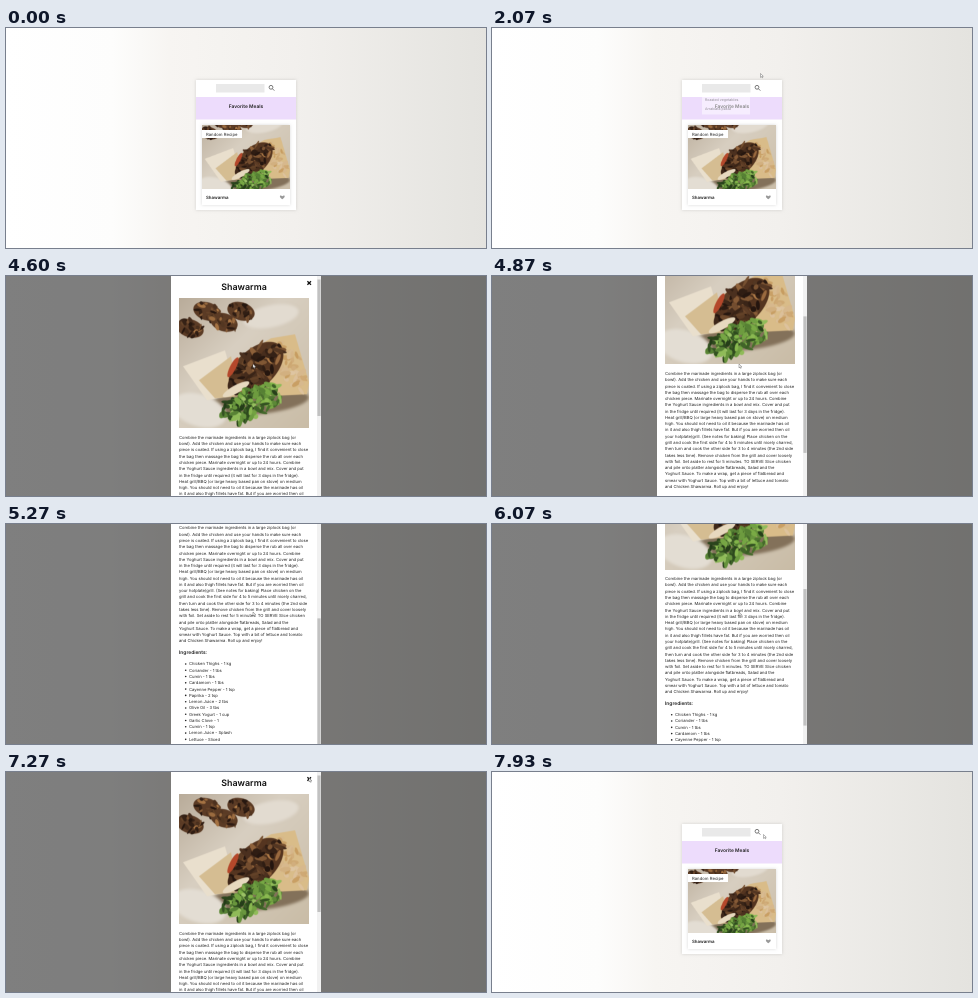
Animation, 480 px wide and 220 px high, one loop 8000 ms. Source, as an HTML page with a canvas:

```html
<!DOCTYPE html>
<html lang="en">
<head>
<meta charset="utf-8">
<title>Favorite Meals</title>
<style>
html, body { margin: 0; width: 100%; height: 100%; overflow: hidden; background: #f6f4f1; }
canvas { display: block; width: 480px; height: 220px; }
</style>
</head>
<body>
<canvas id="stage"></canvas>
<script>
const W = 480, H = 220, LOOP = 8000;
const OPEN = 3870, CLOSE = 7530, MAX_SCROLL = 157.5, LINE = 6.28;
const canvas = document.getElementById('stage');
const ctx = canvas.getContext('2d');
const dpr = window.devicePixelRatio || 1;
canvas.width = W * dpr;
canvas.height = H * dpr;

const method = `Combine the marinade ingredients in a large ziplock bag (or
bowl). Add the chicken and use your hands to make sure each
piece is coated. If using a ziplock bag, I find it convenient to close
the bag then massage the bag to disperse the rub all over each
chicken piece. Marinate overnight or up to 24 hours. Combine
the Yoghurt Sauce ingredients in a bowl and mix. Cover and put
in the fridge until required (it will last for 3 days in the fridge).
Heat grill/BBQ (or large heavy based pan on stove) on medium
high. You should not need to oil it because the marinade has oil
in it and also thigh fillets have fat. But if you are worried then oil
your hotplate/grill. (See notes for baking) Place chicken on the
grill and cook the first side for 4 to 5 minutes until nicely charred,
then turn and cook the other side for 3 to 4 minutes (the 2nd side
takes less time). Remove chicken from the grill and cover loosely
with foil. Set aside to rest for 5 minutes. TO SERVE Slice chicken
and pile onto platter alongside flatbreads, Salad and the
Yoghurt Sauce. To make a wrap, get a piece of flatbread and
smear with Yoghurt Sauce. Top with a bit of lettuce and tomato
and Chicken Shawarma. Roll up and enjoy!`.split('\n');

const ingredients = `Chicken Thighs - 1 kg
Coriander - 1 tbs
Cumin - 1 tbs
Cardamom - 1 tbs
Cayenne Pepper - 1 tsp
Paprika - 2 tsp
Lemon Juice - 2 tbs
Olive Oil - 3 tbs
Greek Yogurt - 1 cup
Garlic Clove - 1
Cumin - 1 tsp
Lemon Juice - Splash
Lettuce - Sliced`.split('\n');

// Pointer moves; it rests wherever the last one ended
const moves = [
  { from: 270, to: 530, x: 238, y: 74 },
  { from: 730, to: 1400, x: 236, y: 60 },
  { from: 1800, to: 2060, x: 268.5, y: 45.5 },
  { from: 2130, to: 2600, x: 262, y: 152 },
  { from: 2670, to: 3470, x: 274, y: 130 },
  { from: 3530, to: 3670, x: 235, y: 133 },
  { from: 4330, to: 4580, x: 247, y: 88 },
  { from: 6730, to: 7270, x: 303, y: 6 },
  { from: 7730, to: 7930, x: 271.5, y: 62.5 }
];

const ramp = (t, a, b) => Math.max(0, Math.min(1, (t - a) / (b - a)));
const ease = p => p * p * (3 - 2 * p);
const mix = (a, b, p) => a + (b - a) * p;

function rect(c, x, y, w, h, fill) {
  c.fillStyle = fill;
  c.fillRect(x, y, w, h);
}

function oval(c, x, y, rx, ry, turn, fill) {
  c.beginPath();
  c.ellipse(x, y, rx, ry, turn, 0, Math.PI * 2);
  c.fillStyle = fill;
  c.fill();
}

function shape(c, points, fill) {
  c.beginPath();
  points.forEach(([x, y]) => c.lineTo(x, y));
  c.closePath();
  c.fillStyle = fill;
  c.fill();
}

function text(s, x, y, size, { bold = false, align = 'left', fill = '#222' } = {}) {
  ctx.font = `${bold ? 600 : 400} ${size}px Inter, sans-serif`;
  ctx.textAlign = align;
  ctx.fillStyle = fill;
  ctx.fillText(s, x, y);
}

function shadowBox(x, y, w, h) {
  ctx.save();
  ctx.shadowColor = 'rgba(0,0,0,0.15)';
  ctx.shadowBlur = 3 * dpr;
  rect(ctx, x, y, w, h, '#fff');
  ctx.restore();
}

function makeRandom(seed) {
  return () => (seed = (seed * 16807) % 2147483647) / 2147483647;
}

// Simplified dish picture, painted once in 130 x 130 units
function paintDish() {
  const pic = document.createElement('canvas');
  pic.width = pic.height = 520;
  const c = pic.getContext('2d');
  const rnd = makeRandom(41);
  c.scale(4, 4);

  // Fill a tilted ellipse with small flecks; tone gets a value from 0 to 1
  function scatter(x, y, rx, ry, turn, count, size, tone) {
    c.save();
    c.translate(x, y);
    c.rotate(turn);
    for (let i = 0; i < count; i++) {
      const a = rnd() * Math.PI * 2, d = Math.sqrt(rnd());
      oval(c, Math.cos(a) * rx * d, Math.sin(a) * ry * d,
        size * (0.5 + rnd()), size * (0.3 + rnd() * 0.4), rnd() * 3, tone(rnd()));
    }
    c.restore();
  }
  const roast = v => `hsl(${18 + v * 12} 42% ${10 + v * v * 40}%)`;
  const herb = v => `hsl(${100 - v * 15} 42% ${16 + v * 42}%)`;
  const crust = v => `hsl(35 48% ${58 + v * 18}%)`;

  const cloth = c.createLinearGradient(0, 0, 130, 130);
  cloth.addColorStop(0, '#b9ac9a');
  cloth.addColorStop(0.4, '#d8cfc1');
  cloth.addColorStop(1, '#c9bca6');
  rect(c, 0, 0, 130, 130, cloth);

  c.filter = 'blur(6px)';
  oval(c, 78, 104, 52, 12, -0.1, '#83715a');
  oval(c, 20, 112, 28, 16, 0.3, '#e3ddd3');
  oval(c, 92, 18, 28, 11, -0.2, '#e2dbd0');
  c.filter = 'blur(1px)';

  for (let i = 0; i < 4; i++) {
    const x = 11 + i * 17, y = i % 2 ? 13 : 30 - i * 3;
    oval(c, x, y, 14, 9, 0.3, '#5b3b25');
    scatter(x, y, 13, 8, 0.3, 22, 3, roast);
  }

  shape(c, [[4, 68], [46, 52], [58, 96], [28, 102]], '#e9dfcd');
  shape(c, [[20, 82], [52, 58], [60, 98], [36, 100]], '#d5bd92');
  shape(c, [[55, 62], [92, 40], [116, 36], [130, 84], [128, 96], [88, 98]], '#d9bc89');
  scatter(112, 70, 27, 12, 1.1, 45, 4, crust);
  oval(c, 77, 70, 33, 19, -0.75, '#553520');
  scatter(77, 70, 32, 18, -0.75, 100, 4.5, roast);
  oval(c, 54, 69, 11, 3, -1.1, '#b4482b');
  oval(c, 57, 91, 15, 4, -0.5, '#e7d9bf');
  scatter(72, 105, 32, 15, -0.4, 150, 4, herb);
  return pic;
}

const dish = paintDish();

function drawBackground() {
  const g = ctx.createLinearGradient(0, 0, W, 0);
  g.addColorStop(0, '#fff');
  g.addColorStop(0.22, '#fdfdfc');
  g.addColorStop(0.34, '#f7f5f2');
  g.addColorStop(0.6, '#f2f0ed');
  g.addColorStop(1, '#e4e3df');
  rect(ctx, 0, 0, W, H, g);
}

function drawSearch(x, y) {
  ctx.strokeStyle = '#777';
  ctx.lineWidth = 1;
  ctx.beginPath();
  ctx.arc(x, y, 1.9, 0, Math.PI * 2);
  ctx.moveTo(x + 1.4, y + 1.4);
  ctx.lineTo(x + 3.3, y + 3.3);
  ctx.stroke();
}

function drawHeart(x, y) {
  ctx.beginPath();
  ctx.moveTo(x, y + 2);
  for (const side of [-1, 1]) {
    ctx.moveTo(x, y + 2);
    ctx.bezierCurveTo(x + side * 4.4, y - 1, x + side * 1.8, y - 3, x, y - 1);
  }
  ctx.fillStyle = '#999';
  ctx.fill();
}

function drawSuggestions(alpha) {
  ctx.save();
  ctx.globalAlpha = alpha;
  rect(ctx, 210, 66, 48, 20.5, '#fff');
  ['Roasted vegetables', 'Arrabiata pasta'].forEach((s, i) =>
    text(s, 213, 73.2 + i * 9, 3.6));
  ctx.restore();
}

function drawApp(t) {
  shadowBox(190, 52, 100, 130);
  rect(ctx, 210, 56, 48.5, 8.5, '#e9e9e9');
  drawSearch(265, 59.3);
  rect(ctx, 190, 69, 100, 22.5, '#eddcfc');
  text('Favorite Meals', 240, 79.8, 4.87, { bold: true, align: 'center' });

  shadowBox(196, 97, 88, 80);
  ctx.drawImage(dish, 0, 72, 520, 375, 196, 97, 88, 63.5);
  rect(ctx, 196, 102, 40, 8, '#fff');
  text('Random Recipe', 200, 107.5, 4.27);
  text('Shawarma', 200, 170.9, 4.4, { bold: true });
  drawHeart(276.3, 169.2);
  drawSuggestions(0.95 * ramp(t, 1330, 1400) * (1 - ramp(t, 2000, 2140)));
}

function drawCross(x, y, r) {
  ctx.strokeStyle = '#111';
  ctx.lineWidth = 1.25;
  ctx.beginPath();
  for (const side of [-1, 1]) {
    ctx.moveTo(x - r, y - r * side);
    ctx.lineTo(x + r, y + r * side);
  }
  ctx.stroke();
}

function drawModal(t) {
  const scroll = MAX_SCROLL * (ease(ramp(t, 4670, 5130)) - ease(ramp(t, 5870, 6400)));
  rect(ctx, 0, 0, W, H, 'rgba(0,0,0,0.5)');
  rect(ctx, 165, 0, 150, H, '#fff');

  ctx.save();
  ctx.translate(0, -scroll);
  text('Shawarma', 238, 13.6, 8.9, { bold: true, align: 'center', fill: '#111' });
  drawCross(303.2, 7, 1.8);
  ctx.drawImage(dish, 173, 22.3, 130, 130);
  method.forEach((line, i) => text(line, 173, 162.9 + i * LINE, 4.18));
  text('Ingredients:', 173, 287.5, 4.9, { bold: true });
  ingredients.forEach((line, i) => {
    const y = 298.9 + i * LINE;
    oval(ctx, 179.7, y - 1.4, 0.8, 0.8, 0, '#222');
    text(line, 183, y, 4.18);
  });
  ctx.restore();

  rect(ctx, 311, 0, 4, H, '#f1f1f1');
  rect(ctx, 311.4, 3.5 + scroll * 0.577, 3.2, 136.5, '#c1c1c1');
}

function drawPointer(t) {
  if (t < moves[0].from) return;
  let x = 64, y = 69;
  for (const m of moves) {
    const p = ease(ramp(t, m.from, m.to));
    x = mix(x, m.x, p);
    y = mix(y, m.y, p);
  }
  ctx.save();
  ctx.translate(x, y);
  ctx.scale(0.85, 0.85);
  shape(ctx, [[0, 0], [0, 4.6], [1.1, 3.6], [1.9, 5.2], [2.6, 4.8], [1.9, 3.3], [3.3, 3.2]], '#fff');
  ctx.strokeStyle = '#555';
  ctx.lineWidth = 0.5;
  ctx.stroke();
  ctx.restore();
}

const start = performance.now();

function frame() {
  const t = (performance.now() - start) % LOOP;
  ctx.setTransform(dpr, 0, 0, dpr, 0, 0);
  ctx.textRendering = 'geometricPrecision';
  ctx.imageSmoothingQuality = 'high';
  drawBackground();
  drawApp(t);
  if (t >= OPEN && t < CLOSE) drawModal(t);
  drawPointer(t);
  requestAnimationFrame(frame);
}

frame();
</script>
</body>
</html>
```
